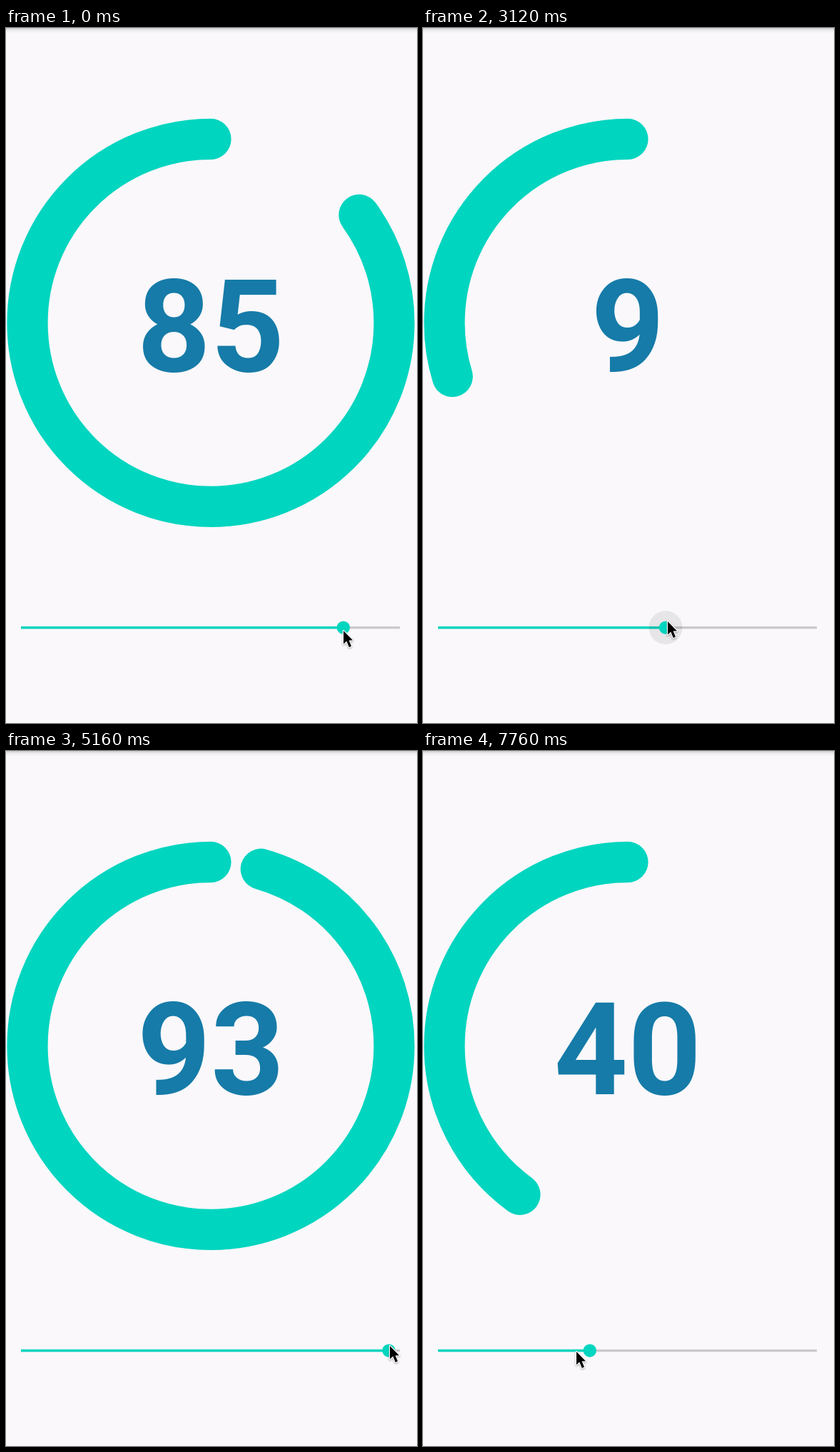
An HTML page that plays this animation: 576 by 972 pixels, repeating every 8200 ms.

```html
<!DOCTYPE html>
<html lang="en">
<head>
<meta charset="utf-8">
<title>Progress ring</title>
<style>
  html, body { margin: 0; width: 100%; height: 100%; overflow: hidden; background: #faf8fb; }
  svg { display: block; width: 100%; height: 100%; }
  text { font: 700 180px Roboto, sans-serif; fill: #167ba8; text-anchor: middle; }
  .ring { fill: none; stroke: #00d5bf; stroke-width: 57.2; stroke-linecap: round; }
  .on { fill: #00d5bf; }
  .cursor path { fill: #000; stroke: #fff; stroke-width: 2.4; paint-order: stroke; stroke-linejoin: round; }
  .cursor { filter: drop-shadow(0 1.5px 1.2px rgba(0, 0, 0, .35)); }
</style>
</head>
<body>
<svg viewBox="0 0 576 972">
  <defs>
    <linearGradient id="shade" x2="0" y2="1">
      <stop offset="0" stop-color="#c9c8cb"/>
      <stop offset=".4" stop-color="#e9e8eb"/>
      <stop offset="1" stop-color="#faf8fb"/>
    </linearGradient>
  </defs>
  <rect width="576" height="972" fill="#faf8fb"/>
  <rect width="576" height="7" fill="url(#shade)"/>
  <circle id="ring" class="ring" r="257" pathLength="100" transform="translate(287 412.4) scale(-1 1) rotate(-90)"/>
  <text id="count" x="287" y="480.4"></text>
  <rect x="21" y="836.9" width="531" height="3.4" fill="#cac9cc"/>
  <rect id="fill" class="on" x="21" y="836.9" height="3.4"/>
  <g id="knob">
    <circle id="halo" fill-opacity=".08"/>
    <circle class="on" r="9.2"/>
  </g>
  <g id="cursor" class="cursor"><path d="M0 0V18.5L4.3 14.6L7.8 23L11 21.6L7.6 13.5L13 13.2Z"/></g>
</svg>
<script>
const LOOP = 8200, STEP = 40;
const SPIN = 1000, MOVE = 600, SLIDE = 120;
const $ = id => document.getElementById(id);
const [ring, count, fill, knob, halo, cursor] =
  ['ring', 'count', 'fill', 'knob', 'halo', 'cursor'].map($);

// Slider presses; slide is how far the knob is dragged after the press
const presses = [
  { at: -SPIN, value: 85 },
  { at: 1010, value: 24, slide: -.9 },
  { at: 2859, value: 60 },
  { at: 4285, value: 97 },
  { at: 6050, value: 40 }
];

// Where the pointer rests and when it gets there
const rests = [
  { at: 0, x: 473, y: 843 },
  { at: 950, x: 146, y: 836.5 },
  { at: 2800, x: 343, y: 830 },
  { at: 4200, x: 538, y: 832 },
  { at: 6000, x: 229, y: 839 },
  { at: 7400, x: 215, y: 840 }
];

const clamp = v => Math.min(1, Math.max(0, v));
const mix = (a, b, k) => a + (b - a) * k;
const ease = k => (1 - Math.cos(Math.PI * clamp(k))) / 2;
const move = (el, x, y) => el.setAttribute('transform', `translate(${x} ${y})`);

function drawSlider(t) {
  const i = presses.findLastIndex(p => p.at <= t);
  const { at, value, slide = 0 } = presses[i];
  const from = i ? presses[i - 1].value : 0;
  const age = t - at;
  const k = ease(age / SPIN);
  ring.setAttribute('stroke-dasharray', `${mix(from, value, k)} 200`);
  count.textContent = Math.floor(value * k);

  const length = 5.31 * (value + slide * ease((age - SLIDE / 2) / SLIDE));
  fill.setAttribute('width', length);
  move(knob, 21.4 + length, 838.6);
  halo.setAttribute('r', 23.5 * Math.min(clamp(age / 60), clamp((600 - age) / 100)));
}

function drawPointer(t) {
  let { x, y } = rests[0];
  for (const r of rests.slice(1)) {
    const k = ease((t - r.at) / MOVE + 1);
    x = mix(x, r.x, k);
    y = mix(y, r.y, k);
  }
  move(cursor, x, y);
}

function tick() {
  const t = Math.floor(performance.now() % LOOP / STEP) * STEP;
  drawSlider(t);
  drawPointer(t);
  requestAnimationFrame(tick);
}
tick();
</script>
</body>
</html>
```
